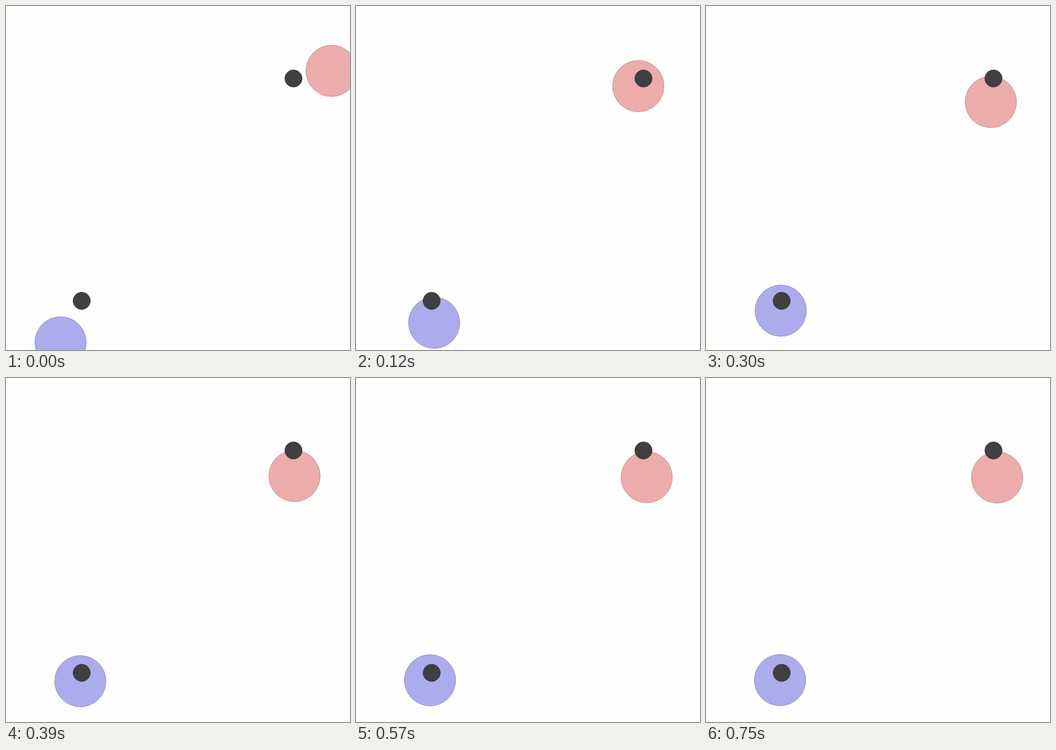
An HTML page for the animation above (780 ms loop, 700 px wide and 700 px high).

```html
<!DOCTYPE html>
<html lang="en">
<head>
<meta charset="utf-8">
<title>Settling circles</title>
<style>
  html, body { margin: 0; width: 100%; height: 100%; overflow: hidden; background: #fefefe; }
  svg { display: block; width: 100%; height: 100%; }
</style>
</head>
<body>
<svg viewBox="0 0 700 700">
  <g stroke-width="1">
    <circle id="red" r="52.2" fill="#ecacac" stroke="#bd8a8a"/>
    <circle id="blue" r="52.2" fill="#acacec" stroke="#8a8abd"/>
  </g>
  <g fill="#404040" stroke="#343434" stroke-width="1">
    <circle cx="585" cy="147.5" r="17.5"/>
    <circle cx="154" cy="600" r="17.5"/>
  </g>
</svg>
<script>
const STEP = 30, STEPS = 26, RATE = 0.25;

// Each goal holds until the step count `until`.
const movers = [
  { el: document.getElementById('red'), start: [662.5, 132], goals: [
    { until: 3, at: [540.2, 163.3] },
    { until: 6, at: [522.6, 201.6] },
    { until: STEPS, at: [592.5, 202.4] }
  ] },
  { el: document.getElementById('blue'), start: [111, 684.5], goals: [
    { until: 3, at: [198.9, 632.6] },
    { until: STEPS, at: [150.6, 614.7] }
  ] }
];

// Every step closes a quarter of the distance to the current goal.
function place({ start, goals }, step) {
  let pos = start, from = 0;
  for (const { until, at } of goals) {
    const n = Math.min(step, until) - from;
    if (n <= 0) break;
    const left = (1 - RATE) ** n;
    pos = pos.map((p, i) => at[i] + (p - at[i]) * left);
    from = until;
  }
  return pos;
}

function draw(ms) {
  const step = Math.floor(ms / STEP) % STEPS;
  for (const m of movers) {
    const [x, y] = place(m, step);
    m.el.setAttribute('cx', x.toFixed(2));
    m.el.setAttribute('cy', y.toFixed(2));
  }
}

let origin = null;
function tick(now) {
  if (origin === null) origin = now;
  draw(now - origin);
  requestAnimationFrame(tick);
}
draw(0);
requestAnimationFrame(tick);
</script>
</body>
</html>
```
